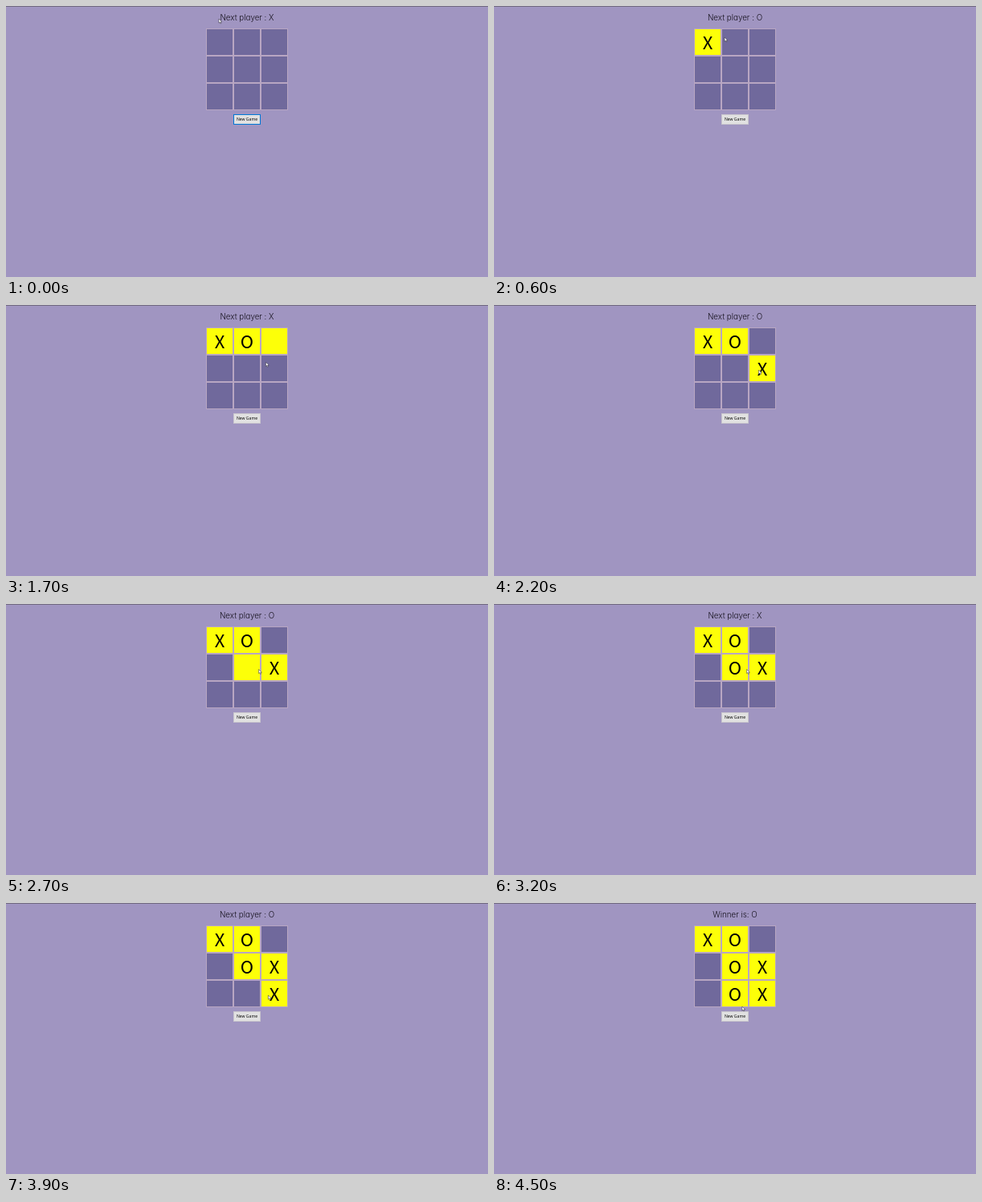
Write an HTML page that moves like this. It is 600 px wide and 338 px high and loops after 4.6 s.

```html
<!DOCTYPE html>
<html lang="en">
<head>
<meta charset="utf-8">
<title>Tic-tac-toe</title>
<style>
  html, body { margin: 0; width: 100%; height: 100%; overflow: hidden; background: #a095c1; }
  svg { display: block; width: 100%; height: 100%; }
  text { text-anchor: middle; }
  #status { font: 300 9.8px Inter, sans-serif; font-feature-settings: "cv11"; fill: #17131f; }
  .mark { font: 400 22px "Noto Sans CJK JP", "Noto Sans CJK", sans-serif; fill: #000; }
  .label { font: 400 5.1px "Open Sans", sans-serif; fill: #000; }
</style>
</head>
<body>
<svg viewBox="0 0 600 338">
  <rect width="600" height="338" fill="#a095c1"/>
  <rect width="600" height="1" fill="#70687f"/>
  <text id="status" x="300" y="18.3"></text>
  <g id="board"></g>
  <rect id="button" x="283.5" y="135.5" width="33" height="12" fill="#e1e1e1"/>
  <text class="label" x="300" y="143.4">New Game</text>
  <path id="cursor" d="M0 0V5.2L1.2 4.1L2 6L2.9 5.6L2.1 3.8H3.8Z" fill="#fff" stroke="#2b2735" stroke-width=".5"/>
</svg>
<script>
const LOOP = 4600, STEP = 100, HOVER_LAG = 50;
const LEFT = 249, TOP = 28, SIZE = 34;

// pointer travel: leave, arrive, x, y
const home = [265, 16];
const hops = [
  [100, 200, 275, 46], [500, 700, 299, 32], [1450, 1800, 329.5, 81],
  [2200, 2500, 314.6, 81.5], [3200, 3500, 317, 110], [3500, 3600, 326.4, 115],
  [3900, 4200, 309, 136], [4200, 4400, 305, 111], [4400, 4500, 308.8, 129]
];
const clicks = [400, 1200, 2200, 3100, 3900, 4400];

// winning lines: first cell and stride
const lines = [0, 1, 2].flatMap(i => [[3 * i, 1], [i, 3]]).concat([[0, 4], [2, 2]]);

const $ = id => document.getElementById(id);
const smooth = u => u * u * (3 - 2 * u);

function add(parent, tag, attrs) {
  const el = document.createElementNS("http://www.w3.org/2000/svg", tag);
  for (const key in attrs) el.setAttribute(key, attrs[key]);
  return parent.appendChild(el);
}

function pointerAt(t) {
  let [x, y] = home;
  for (const [leave, arrive, toX, toY] of hops) {
    const s = smooth(Math.min(1, Math.max(0, (t - leave) / (arrive - leave))));
    x += (toX - x) * s;
    y += (toY - y) * s;
  }
  return [x, y];
}

function cellAt(t) {
  const [x, y] = pointerAt(t);
  const col = Math.floor((x - LEFT) / SIZE), row = Math.floor((y - TOP) / SIZE);
  return Math.min(col, row) < 0 || Math.max(col, row) > 2 ? -1 : 3 * row + col;
}

const cells = Array.from({ length: 9 }, (_, i) => {
  const x = LEFT + 0.5 + SIZE * (i % 3), y = TOP + 0.5 + SIZE * Math.floor(i / 3);
  return {
    box: add($("board"), "rect", { x, y, width: 33, height: 33, stroke: "#b8a6c2" }),
    mark: add($("board"), "text", { class: "mark", x: x + 16.5, y: y + 25.3 })
  };
});

function draw(time) {
  const t = Math.floor(time % LOOP / STEP) * STEP;
  const board = Array(9).fill("");
  const played = clicks.filter(at => at <= t);
  played.forEach((at, i) => board[cellAt(at)] = "XO"[i % 2]);

  const hover = cellAt(t - HOVER_LAG);
  cells.forEach(({ box, mark }, i) => {
    box.setAttribute("fill", board[i] || i === hover ? "#fdff08" : "#70699c");
    mark.textContent = board[i];
  });

  const win = lines.find(([a, d]) => board[a] && board[a] === board[a + d] && board[a] === board[a + 2 * d]);
  $("status").textContent = win ? "Winner is: " + board[win[0]] : "Next player : " + "XO"[played.length % 2];
  $("button").setAttribute("stroke", played.length ? "#c8c5cd" : "#0078d7");
  $("cursor").setAttribute("transform", `translate(${pointerAt(t)})`);
}

const start = performance.now();
function tick() {
  draw(performance.now() - start);
  requestAnimationFrame(tick);
}
tick();
</script>
</body>
</html>
```
